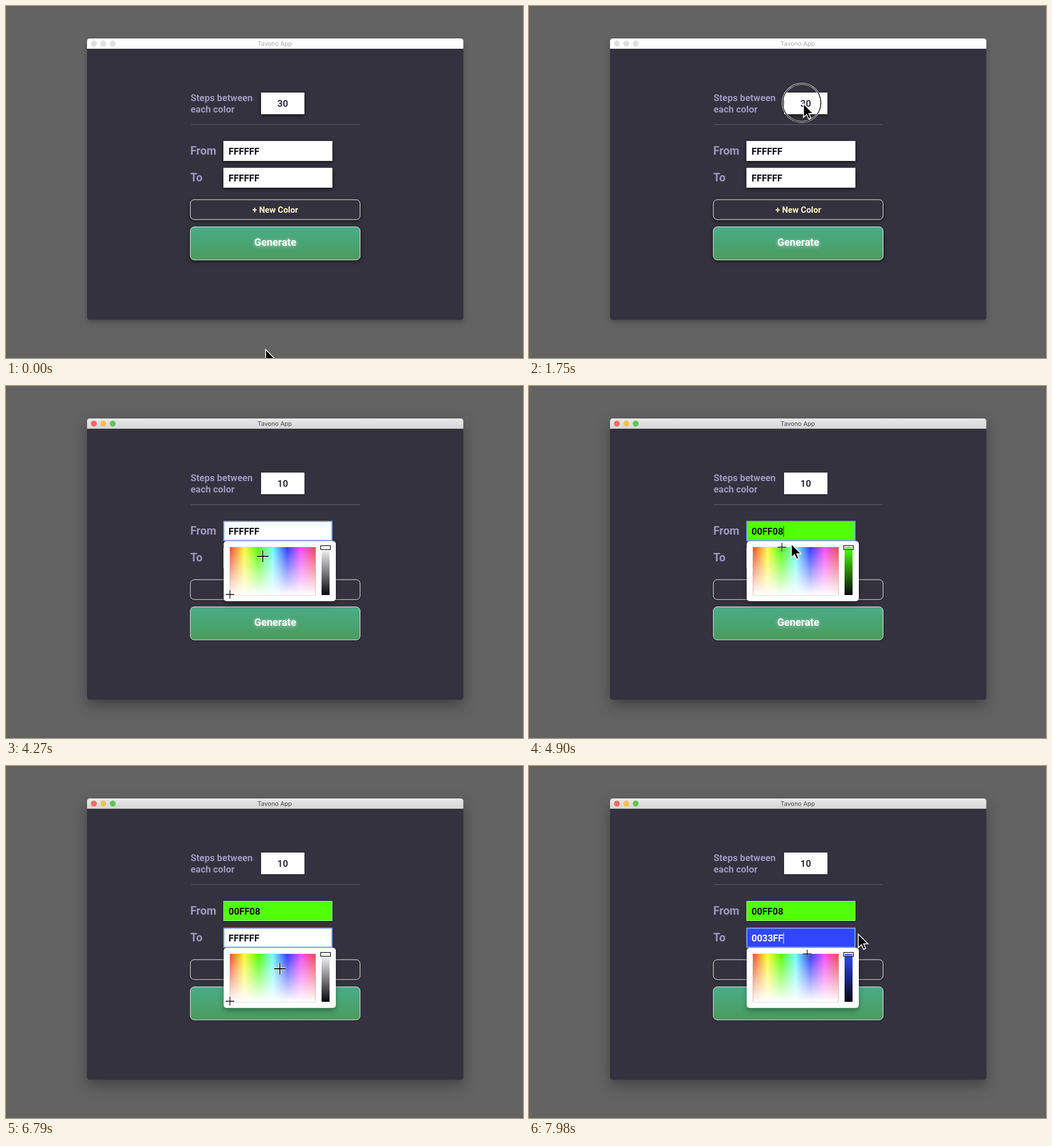
Recreate the animation shown at these times as an HTML page. Size 906 by 618 pixels, loop 8000 ms.

```html
<!DOCTYPE html>
<html lang="en">
<head>
<meta charset="utf-8">
<title>Gradient steps</title>
<style>
  html, body { margin: 0; width: 100%; height: 100%; overflow: hidden; background: #636363; }
  svg { display: block; width: 100%; height: 100%; }
  text { font-family: Roboto, sans-serif; font-weight: 700; font-size: 16.4px; }
  .mid { text-anchor: middle; }
  .label { fill: #9d99bf; }
  .big { font-size: 19.7px; }
  .bar { fill: #fff; }
  .title { font: 400 10.7px Inter, sans-serif; fill: #a9a9a9; }
  .lights circle { fill: #dfdfdf; }
  .window { filter: drop-shadow(0 5px 5px rgba(0, 0, 0, .22)); }
  .active .window { filter: drop-shadow(0 10px 12px rgba(0, 0, 0, .33)); }
  .active .bar { fill: url(#barFill); }
  .active .title { fill: #454545; }
  .active .red { fill: #ee6d62; }
  .active .amber { fill: #f5c04f; }
  .active .green { fill: #5ec556; }
  .raised { filter: drop-shadow(0 2px 3px rgba(0, 0, 0, .6)); }
  .picking .raised { filter: drop-shadow(0 1px 1px rgba(0, 0, 0, .5)); }
  .button { stroke: #f2f2f2; stroke-width: 1; }
  .focus { fill: none; stroke: #79a4ee; stroke-width: 2; }
  .edge { fill: none; stroke: #fff; stroke-opacity: .6; }
  .glow { filter: drop-shadow(0 1px 3px rgba(255, 255, 255, .55)); }
  #picker { filter: drop-shadow(0 5px 5px rgba(0, 0, 0, .3)); }
  .halo { fill: none; stroke: #fff; }
  .ink { fill: none; stroke: #111; }
</style>
</head>
<body>
<svg id="stage" viewBox="0 0 906 618" preserveAspectRatio="none">
  <defs>
    <linearGradient id="barFill" x2="0" y2="1">
      <stop stop-color="#e9e9e9"/><stop offset="1" stop-color="#d5d5d5"/>
    </linearGradient>
    <linearGradient id="goFill" x2="0" y2="1">
      <stop stop-color="#49ac88"/><stop offset="1" stop-color="#4a9c5b"/>
    </linearGradient>
    <linearGradient id="hues">
      <stop stop-color="#ec4a2b"/>
      <stop offset=".167" stop-color="#fff93a"/>
      <stop offset=".333" stop-color="#50ff08"/>
      <stop offset=".5" stop-color="#73fdff"/>
      <stop offset=".667" stop-color="#2f3cff"/>
      <stop offset=".833" stop-color="#f54cf8"/>
      <stop offset="1" stop-color="#ee4650"/>
    </linearGradient>
    <linearGradient id="fade" x2="0" y2="1">
      <stop stop-color="#fff" stop-opacity="0"/><stop offset="1" stop-color="#fff"/>
    </linearGradient>
    <linearGradient id="shade" x2="0" y2="1">
      <stop id="shadeTop" stop-color="#fff"/><stop offset="1" stop-color="#07070c"/>
    </linearGradient>
    <path id="arrow" d="M0 0V24L5.5 18.8L9.3 27L13 25.3L9.4 17.3H17Z"/>
    <path id="beam" d="M-5 -12Q0 -12 0 -8Q0 -12 5 -12M0 -8V8M-5 12Q0 12 0 8Q0 12 5 12M-3 5H3"/>
    <path id="cross" d="M-10 0H10M0 -10V10"/>
    <path id="plus" d="M-7.5 0H7.5M0 -7.5V7.5"/>
  </defs>

  <rect width="906" height="618" fill="#636363"/>
  <g class="window">
    <rect x="142" y="57" width="659.5" height="494" rx="4.5" fill="#34323e"/>
    <path class="bar" d="M142 75V62Q142 57 147 57H796.5Q801.5 57 801.5 62V75Z"/>
  </g>
  <g class="lights">
    <circle class="red" cx="154" cy="66" r="5.2"/>
    <circle class="amber" cx="170.5" cy="66" r="5.2"/>
    <circle class="green" cx="187" cy="66" r="5.2"/>
  </g>
  <text class="title mid" x="471" y="70">Tavono App</text>

  <text class="label" x="323.5" y="167.3">Steps between</text>
  <text class="label" x="323.5" y="187.2">each color</text>
  <path d="M324 208.2H620" stroke="#63607a"/>
  <rect class="raised" x="447" y="152" width="76" height="38" fill="#fff"/>
  <rect id="selection" x="475.5" y="161" height="20" fill="#b7d6f7"/>
  <text id="steps" class="mid" x="485" y="176.8" fill="#34323e"></text>
  <rect id="stepsFocus" class="focus" x="447.5" y="152.5" width="75" height="37"/>

  <text class="label big" x="323" y="260.6">From</text>
  <text class="label big" x="323" y="307.6">To</text>
  <g id="fields"></g>

  <rect class="button raised" x="323" y="340" width="297.5" height="35" rx="7" fill="#34323e"/>
  <text class="mid" x="471.8" y="362.7" fill="#fdfbc0" style="font-size:14.76px">+ New Color</text>
  <rect class="button raised" x="323" y="387.8" width="297.5" height="58" rx="7" fill="url(#goFill)"/>
  <text class="mid glow" x="471.8" y="421" fill="#fff" style="font-size:18.04px">Generate</text>

  <path id="caret" d="M0 -14V5"/>

  <g id="picker">
    <rect x="381.5" y="272.3" width="196.5" height="105.5" rx="5" fill="#fff"/>
    <rect x="392" y="282.5" width="151" height="85" fill="#bbb"/>
    <rect x="392.5" y="283" width="150" height="84" fill="url(#hues)"/>
    <rect x="392.5" y="283" width="150" height="84" fill="url(#fade)"/>
    <rect x="553" y="283" width="14" height="84" fill="url(#shade)"/>
    <rect class="ink" x="551.5" y="280.5" width="17" height="6.5" stroke-width="1.4"/>
    <rect class="halo" x="552.7" y="281.7" width="14.6" height="4.1"/>
    <g id="marker">
      <use href="#plus" class="halo" stroke-width="3" stroke-opacity=".6"/>
      <use href="#plus" class="ink" stroke-width="1.3"/>
    </g>
  </g>

  <g id="ring">
    <circle class="halo" stroke-width="3"/>
    <circle class="ink" stroke-width="1.4"/>
  </g>
  <g id="pointer">
    <use id="arrowShape" href="#arrow" fill="#000" stroke="#fff" stroke-width="1.5"/>
    <g id="beamShape">
      <use href="#beam" class="halo" stroke-width="3.4"/>
      <use href="#beam" class="ink" stroke-width="1.7"/>
    </g>
    <g id="crossShape">
      <use href="#cross" class="halo" stroke-width="4.2"/>
      <use href="#cross" class="ink" stroke-width="1.8"/>
    </g>
  </g>
</svg>
<script>
const LOOP = 8000, ACTIVE_FROM = 1820, ROW = 47;
const $ = id => document.getElementById(id);
const show = (id, on) => { $(id).style.display = on ? '' : 'none'; };
const place = (id, x, y) => $(id).setAttribute('transform', `translate(${x} ${y})`);
const clamp = (v, lo, hi) => Math.min(hi, Math.max(lo, v));
const between = (t, a, b) => t >= a && t < b;
const inside = (p, x, y, w, h) => between(p.x, x, x + w) && between(p.y, y, y + h);

// time, x, y
const path = [
  [0, 455, 603], [490, 458, 603], [1330, 477, 170], [1540, 478, 170], [1750, 481, 171.5],
  [2250, 474, 176], [2700, 475, 176], [3100, 502, 176], [3420, 502, 178], [3780, 450, 256],
  [3900, 450, 257], [4270, 450, 299], [4470, 450, 299], [4720, 443.28, 282.5], [4840, 443.28, 282.5],
  [5180, 637, 220], [5300, 637, 220], [5600, 585, 264], [6040, 470, 302], [6200, 470, 303],
  [6790, 480, 356], [7060, 482, 350], [7360, 487.5, 329.5], [7480, 487.5, 329.5], [7960, 577, 295]
];
const clicks = [1540, 2660, 3850, 4480, 5250, 6160, 7080];
const fields = [
  { y: 237, open: 3890, close: 5270, press: 4480, release: 4800 },
  { y: 284, open: 6190, close: LOOP, press: 7080, release: 7440 }
];

fields.forEach((f, i) => {
  $('fields').insertAdjacentHTML('beforeend', `
    <rect id="fill${i}" class="raised" x="381" y="${f.y}" width="191" height="35"/>
    <rect class="edge" x="381.5" y="${f.y + .5}" width="190" height="34"/>
    <text id="hex${i}" x="390" y="${f.y + 23.6}"></text>
    <rect id="focus${i}" class="focus" x="381.7" y="${f.y + .7}" width="189.6" height="33.6"/>`);
});

function pointerAt(t) {
  const i = path.findIndex(k => k[0] > t);
  if (i < 0) { const [, x, y] = path[path.length - 1]; return { x, y }; }
  const [t0, x0, y0] = path[i - 1], [t1, x1, y1] = path[i];
  const u = (t - t0) / (t1 - t0), e = u * u * (3 - 2 * u);
  return { x: x0 + (x1 - x0) * e, y: y0 + (y1 - y0) * e };
}

function padColor(mx, my) {
  const hue = mx / 150 * 6, sat = 1 - my / 84;
  return [5, 3, 1].map(n => {
    const k = (n + hue) % 6;
    return Math.round(255 * (1 - sat * clamp(Math.min(k, 4 - k), 0, 1)));
  });
}

// Wide-gamut screen look: pure greens and blues come out slightly mixed.
const screenColor = ([r, g, b]) =>
  `rgb(${[Math.max(r, .31 * g + .13 * b), g + .1 * b * (1 - g / 255), b].map(Math.round)})`;
const toHex = rgb => rgb.map(v => v.toString(16).padStart(2, '0')).join('').toUpperCase();

function fieldState(f, t) {
  let mx = 0, my = 84;
  if (t >= f.press) {
    const p = pointerAt(Math.min(t, f.release));
    mx = clamp(p.x - 392.5, 0, 150);
    my = clamp(p.y - (f.y + 46), 0, 84);
  }
  const rgb = padColor(mx, my);
  const light = .213 * rgb[0] + .715 * rgb[1] + .072 * rgb[2] > 127.5;
  return { mx, my, rgb, ink: light ? '#101018' : '#fff' };
}

function drawFields(t) {
  show('picker', false);
  show('caret', false);
  fields.forEach((f, i) => {
    const s = fieldState(f, t), open = between(t, f.open, f.close), color = screenColor(s.rgb);
    $('fill' + i).setAttribute('fill', color);
    $('hex' + i).textContent = toHex(s.rgb);
    $('hex' + i).setAttribute('fill', s.ink);
    show('focus' + i, open);
    if (!open) return;
    show('picker', true);
    place('picker', 0, i * ROW);
    place('marker', 392.5 + s.mx, 283 + Math.min(s.my, 83));
    $('shadeTop').setAttribute('stop-color', color);
    show('caret', t % 1060 >= 530);
    place('caret', 390.5 + $('hex' + i).getComputedTextLength(), f.y + 23);
    $('caret').setAttribute('stroke', s.ink);
  });
}

function drawSteps(t, p) {
  $('steps').textContent = t < 3220 ? '30' : t < 3360 ? '1' : '10';
  show('stepsFocus', between(t, 2660, 3890));
  show('selection', between(t, 2700, 3220));
  $('selection').setAttribute('width', clamp(p.x - 475.5, 0, 19));
}

function drawPointer(t, p) {
  const open = fields.find(f => between(t, f.open, f.close));
  const onPad = open && inside(p, 392, open.y + 45, 151, 86);
  const onPicker = open && inside(p, 381, open.y + 35, 197, 106);
  const onInput = inside(p, 447, 152, 76, 38) || fields.some(f => inside(p, 381, f.y, 191, 35));
  const beam = t >= ACTIVE_FROM && onInput && !onPicker;
  show('crossShape', onPad);
  show('beamShape', beam);
  show('arrowShape', !onPad && !beam);
  place('pointer', p.x, p.y);
}

function drawRing(t) {
  const start = clicks.find(c => between(t, c, c + 330));
  show('ring', start !== undefined);
  if (start === undefined) return;
  const age = t - start, p = pointerAt(start), left = 1 - Math.min(1, age / 200);
  place('ring', p.x, p.y);
  $('ring').querySelectorAll('circle').forEach(c => c.setAttribute('r', 33.5 - 24 * left * left));
  $('ring').setAttribute('opacity', clamp((330 - age) / 110, 0, 1));
}

function render(t) {
  const p = pointerAt(t);
  $('stage').classList.toggle('active', t >= ACTIVE_FROM);
  $('stage').classList.toggle('picking', fields.some(f => between(t, f.open, f.close)));
  drawSteps(t, p);
  drawFields(t);
  drawRing(t);
  drawPointer(t, p);
}

const begin = performance.now();
function tick() {
  render((performance.now() - begin) % LOOP);
  requestAnimationFrame(tick);
}
tick();
</script>
</body>
</html>
```
